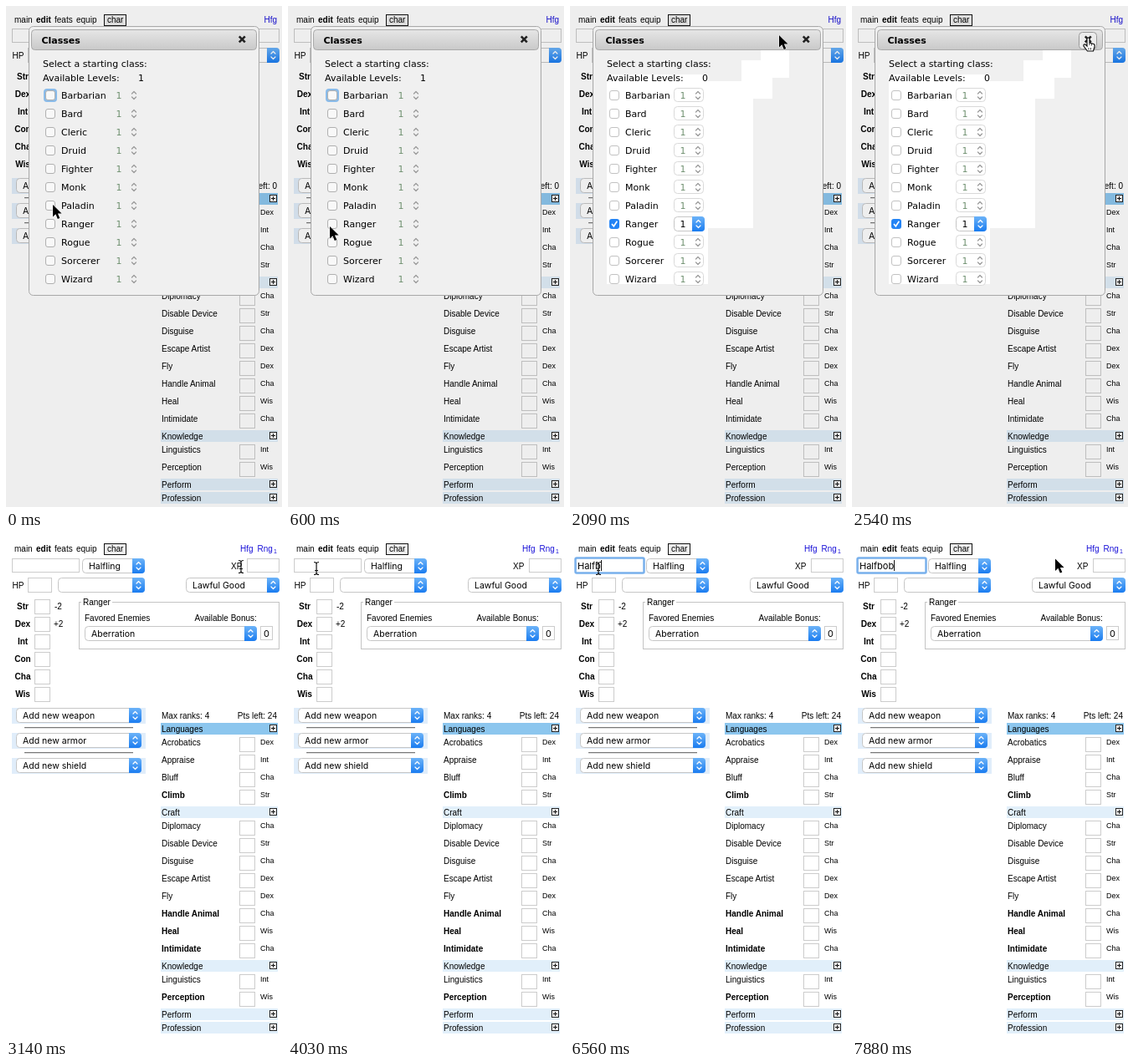
Write an HTML page that moves like this. It is 330 by 600 pixels and loops after 8000 ms.

```html
<!DOCTYPE html>
<html lang="en">
<head>
<meta charset="utf-8">
<title>Character sheet</title>
<style>
html, body { margin: 0; width: 330px; height: 600px; overflow: hidden; background: #fff; }
svg { display: block; }
text { font: 10px "Liberation Sans", Arial, sans-serif; }
.bold { font-weight: bold; }
.small { font-size: 9px; }
.ui { font: 10.5px Inter, sans-serif; }
.field { font: 11px Inter, sans-serif; }
.dialog { font: 11px "DejaVu Sans", sans-serif; }
.heading { font: bold 11px "DejaVu Sans", sans-serif; }
.tiny { font-size: 7px; }
.end { text-anchor: end; }
.mid { text-anchor: middle; }
.link { fill: #1a12d8; }
.dim { fill: #6f9070; }
.chevron { fill: none; stroke-width: 1.2; stroke-linecap: round; stroke-linejoin: round; }
</style>
</head>
<body>
<svg id="stage" width="330" height="600" viewBox="0 0 330 600"></svg>
<script>
const LOOP = 8000;
const stage = document.getElementById('stage');

const text = (x, y, s, cls = '') => `<text x="${x}" y="${y}" class="${cls}">${s}</text>`;
const fill = (x, y, w, h, color, r = 0) =>
  `<rect x="${x}" y="${y}" width="${w}" height="${h}" rx="${r}" fill="${color}"/>`;
const box = (x, y, w, h, stroke = '#ccc', r = 0, color = '#fff') =>
  `<rect x="${x + .5}" y="${y + .5}" width="${w - 1}" height="${h - 1}" rx="${r}" fill="${color}" stroke="${stroke}"/>`;
const chevrons = (x, y, color) =>
  `<path class="chevron" stroke="${color}" d="M${x - 2.5} ${y - 2}l2.5-2.5 2.5 2.5m-5 4l2.5 2.5 2.5-2.5"/>`;
const group = (id, content) => `<g id="${id}">${content}</g>`;

function select(x, y, w, label, h = 18) {
  const right = x + w;
  return box(x, y, w, h, '#c6c6c6', 4) +
    `<path fill="url(#blue)" d="M${right - 15} ${y}h11q4 0 4 4v${h - 8}q0 4-4 4h-11z"/>` +
    chevrons(right - 7.5, y + h / 2, '#fff') + text(x + 8, y + h / 2 + 4, label, 'ui');
}

function strip(y, label, color = '#e1effa') {
  return fill(185, y - 7, 140, 14, color) + text(186, y + 4, label) +
    box(315, y - 5, 9, 9, '#222') + `<path stroke="#111" d="M317 ${y - .5}h5m-2.5-2.5v5"/>`;
}

const skills = [
  [248, 'Acrobatics Dex|Appraise Int|Bluff Cha|*Climb Str'],
  [348, 'Diplomacy Cha|Disable Device Str|Disguise Cha|Escape Artist Dex|Fly Dex|*Handle Animal Cha|*Heal Wis|*Intimidate Cha'],
  [532, 'Linguistics Int|*Perception Wis'],
];

function skillRows(classChosen) {
  return skills.map(([top, list]) => list.split('|').map((row, i) => {
    const y = top + i * 21, name = row.slice(0, -4).replace('*', '');
    const cls = classChosen && row[0] === '*' ? 'bold' : '';
    return text(186, y + 4, name, cls) + box(279, y - 6, 19, 18) + text(304, y + 2.5, row.slice(-3), 'small');
  }).join('')).join('');
}

function page(classChosen) {
  const menu = text(10, 20, 'main') + text(36, 20, 'edit', 'bold') + text(58, 20, 'feats') +
    text(84, 20, 'equip') + box(117, 10, 27, 14, '#111', 0, '#eee') + text(121, 20, 'char') +
    (classChosen
      ? text(280, 20, 'Hfg', 'link') + text(300.5, 20, 'Rng', 'link') + text(320, 22, '1', 'link tiny')
      : text(324, 20, 'Hfg', 'link end'));

  const identity = box(7, 28, 81, 17) + select(91, 28, 75, 'Halfling') +
    text(269, 41, 'XP') + box(288, 28, 39, 17) +
    text(7.5, 64, 'HP') + box(26, 51, 29, 18) + select(62, 51, 104, '') + select(215, 51, 112, 'Lawful Good');

  const stats = ['Str', 'Dex', 'Int', 'Con', 'Cha', 'Wis'].map((name, i) =>
    text(20, 89 + i * 21, name, 'bold mid') + box(34, 77 + i * 21, 19, 18)).join('');

  const classPanel = text(58, 89, '-2') + text(57, 110, '+2') +
    box(87, 80, 240, 57, '#c4c4c4') + fill(90, 78, 37, 6, '#fff') + text(92, 84, 'Ranger') +
    text(94, 103, 'Favored Enemies') + text(225.5, 103, 'Available Bonus:') +
    select(94, 109, 206, 'Aberration') + box(304, 109, 15, 17) + text(308, 122, '0', 'field');

  const gear = ['weapon', 'armor', 'shield'].map((name, i) => {
    const y = 207 + i * 30;
    return fill(7, y, 160, 19, '#e0edfa') + select(12, y, 150, 'Add new ' + name) +
      (i < 2 ? fill(22, y + 23, 130, 1, '#777') + fill(22, y + 24, 130, 1, '#ddd') : '');
  }).join('');

  const right = text(186, 220, 'Max ranks: 4') + text(324, 220, 'Pts left: ' + (classChosen ? 24 : 0), 'end') +
    strip(232, 'Languages', '#8cc6ee') + strip(332, 'Craft') + strip(516, 'Knowledge') +
    strip(574, 'Perform') + strip(590, 'Profession') + skillRows(classChosen);

  const shift = classChosen ? 0 : -1;
  return menu + `<g transform="translate(0 ${shift})">` + identity + stats +
    (classChosen ? classPanel : '') + gear + right + '</g>';
}

const classes = 'Barbarian Bard Cleric Druid Fighter Monk Paladin Ranger Rogue Sorcerer Wizard'.split(' ');

function classRow(name, i, picked) {
  const y = 107 + i * 22;
  const chosen = picked && name === 'Ranger';
  let row = text(66, y + 4, name, 'dialog');
  if (chosen) {
    row += fill(47, y - 6, 12, 12, '#2484f5', 3) +
      `<path d="M50 ${y}l2.3 2.8 4-6" fill="none" stroke="#fff" stroke-width="1.6"/>` +
      select(124, y - 9, 37, '') + text(131.5, y + 4, 1, 'dialog');
  } else {
    if (!picked && i === 0) row += fill(45, y - 8, 16, 16, '#8abbe9', 4);
    row += box(47, y - 6, 12, 12, picked ? '#c2c2c2' : '#b0b0b0', 2.5, picked ? '#fff' : '#f8f8f8');
    if (picked) row += box(124, y - 9, 36, 17, '#d9d9d9', 4);
    row += text(131.5, y + 4, 1, 'dialog dim') + chevrons(153, y, '#999');
  }
  return row;
}

const classList = picked => text(165, 90, picked ? 0 : 1, 'dialog end') +
  classes.map((name, i) => classRow(name, i, picked)).join('');

// Areas of the dialog repainted in white: start time, x, y, width, height.
const patches = [
  [1050, 44, 82, 121, 251],
  [1650, 60, 90, 159, 176],
  [1800, 205, 65, 37, 46],
  [1950, 228, 52, 34, 34],
];

const dialog = box(27, 24, 276, 323, '#a8a8a8', 5, '#f0f0f0') +
  patches.map(([, x, y, w, h], i) => group('patch' + i, fill(x, y, w, h, '#fff'))).join('') +
  box(30, 28, 270, 25, '#aaa', 4, 'url(#bar)') + text(42.5, 45, 'Classes', 'heading') +
  group('hover', box(271, 31, 22, 21, '#999', 4, '#ececec')) +
  '<path d="M278.8 36.3l7 7m0-7l-7 7" stroke="#222" stroke-width="2.6"/>' +
  text(44, 73, 'Select a starting class:', 'dialog') + text(44, 90, 'Available Levels:', 'dialog') +
  group('unpicked', classList(false)) + group('picked', classList(true));

const pointers = {
  arrow: '<path d="M0 0V14.5L3.4 11.3 5.8 17 8.3 15.9 5.9 10.5H10.6Z" stroke="#fff" paint-order="stroke"/>',
  beam: '<path d="M-3-7.5Q0-7.5 0-5.5Q0-7.5 3-7.5M0-5.5V5.5M-3 7.5Q0 7.5 0 5.5Q0 7.5 3 7.5M-2 2.5H2" fill="none" stroke="#111" stroke-width="1.2"/>',
  hand: '<path d="M-1-7Q.5-9 2-7V-2L7-.5Q8.5 0 8 3L6.500 8H-.5L-5 2Q-5.500-.5-3 0L-1 2Z" fill="#fff" stroke="#111" stroke-width="1.2"/><path d="M2-2V1M4.500-1V1.500M1 4V6.500M3.500 4V6.500" stroke="#111" stroke-width=".8"/>',
};

// Pointer stops: start time, shape, x, y.
const stops = [
  [0, 'arrow', 56, 238], [150, 'arrow', 58, 272], [450, 'arrow', 53, 267], [600, 'arrow', 50, 264],
  [1500, 'arrow', 60, 248], [1650, 'arrow', 207, 92], [1800, 'arrow', 230, 67], [1950, 'arrow', 250, 35],
  [2100, 'arrow', 264, 34], [2240, 'hand', 276, 45], [2390, 'hand', 280, 46], [2540, 'hand', 282, 46],
  [3140, 'beam', 281, 38], [3440, 'arrow', 196, 48], [3590, 'arrow', 70, 58], [3740, 'arrow', 3, 60],
  [3880, 'beam', 22, 44], [4030, 'beam', 34, 40],
  [7300, 'beam', 50, 40], [7450, 'arrow', 110, 33], [7590, 'arrow', 180, 31], [7740, 'arrow', 228, 29],
  [7880, 'arrow', 243, 28.5],
];

const typed = 'Halfbob';
const keyTimes = [5530, 5820, 5970, 6110, 6560, 6700, 6850];

const gradient = (id, top, bottom) => `<linearGradient id="${id}" x2="0" y2="1">
  <stop stop-color="${top}"/><stop offset="1" stop-color="${bottom}"/></linearGradient>`;

stage.innerHTML = `<defs>${gradient('blue', '#6cb3f8', '#1a7cf0')}${gradient('bar', '#e6e6e6', '#c9c9c9')}</defs>` +
  group('before', page(false) + '<rect width="330" height="600" opacity=".065"/>' + dialog) +
  group('after', page(true) +
    group('focus', '<rect x="6.500" y="27.500" width="82" height="18" rx="1.500" fill="#fff" stroke="#78b0ec" stroke-width="2.500"/>') +
    text(9, 41, '', 'field" id="name') + group('caret', fill(0, 30, 1, 13, '#111'))) +
  Object.entries(pointers).map(([id, shape]) => group(id, shape)).join('');

const el = id => document.getElementById(id);
const show = (id, on) => el(id).setAttribute('display', on ? 'inline' : 'none');

function draw(t) {
  show('before', t < 3140);
  show('after', t >= 3140);
  show('unpicked', t < 1050);
  show('picked', t >= 1050);
  show('hover', t >= 2240);
  patches.forEach(([start], i) => show('patch' + i, t >= start));

  show('focus', t >= 4480);
  show('caret', t >= 4480 && (t < 5080 || t >= 5530));
  const name = el('name');
  name.textContent = typed.slice(0, keyTimes.filter(k => k <= t).length);
  const caretX = 9 + Math.round(name.textContent ? name.getComputedTextLength() : 0);
  el('caret').setAttribute('transform', `translate(${caretX} 0)`);

  const [, shape, x, y] = stops.filter(s => s[0] <= t).pop();
  for (const id in pointers) show(id, id === shape);
  el(shape).setAttribute('transform', `translate(${x} ${y})`);
}

const startTime = performance.now();
function tick() {
  draw((performance.now() - startTime) % LOOP);
  requestAnimationFrame(tick);
}
tick();
</script>
</body>
</html>
```
